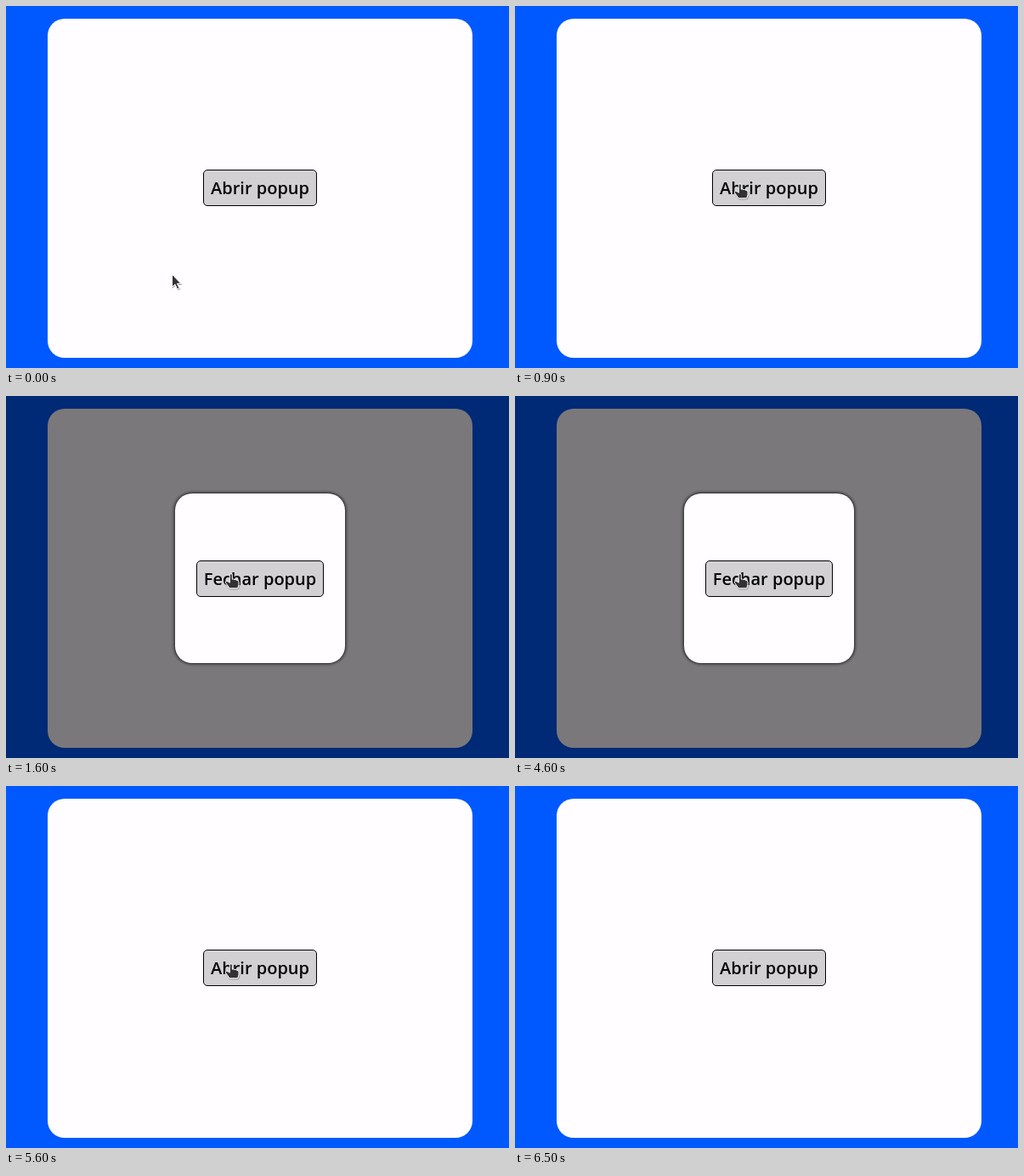
Recreate the animation shown at these times as an HTML page. Size 592 by 427 pixels, loop 7500 ms.

```html
<!DOCTYPE html>
<html lang="pt">
<head>
<meta charset="utf-8">
<title>Popup</title>
<style>
  html, body { margin: 0; width: 100%; height: 100%; overflow: hidden; background: #0059ff; }
  svg { display: block; width: 592px; height: 427px; }
  text { font: 600 20px "Open Sans", "Noto Sans", sans-serif; text-anchor: middle; fill: #050407; }
  .button { fill: #d2d0d2; stroke: #000; }
  .cursor path { fill: #333136; stroke: #fff; stroke-linejoin: round; }
</style>
</head>
<body>
<svg viewBox="0 0 592 427" xmlns="http://www.w3.org/2000/svg">
  <defs>
    <filter id="blur" x="-10%" y="-10%" width="120%" height="120%">
      <feGaussianBlur stdDeviation="1.4"/>
    </filter>
    <filter id="shade" x="-50%" y="-50%" width="200%" height="200%">
      <feDropShadow dx="0.5" dy="1" stdDeviation="0.7" flood-opacity="0.45"/>
    </filter>
  </defs>
  <rect id="page" width="592" height="427"/>
  <rect id="card" x="49" y="15" width="500" height="400" rx="20"/>
  <g id="main">
    <rect class="button" x="232.5" y="193.5" width="133" height="42" rx="4.5"/>
    <text x="299" y="222">Abrir popup</text>
  </g>
  <g id="popup">
    <rect x="197.5" y="113.5" width="203" height="203" rx="21.5" fill="#151318" opacity=".75" filter="url(#blur)"/>
    <rect x="199" y="115" width="200" height="200" rx="20" fill="#fffdff"/>
    <rect class="button" x="224.5" y="194.5" width="149" height="42" rx="4.5"/>
    <text x="299" y="223">Fechar popup</text>
  </g>
  <g id="arrow" class="cursor" filter="url(#shade)">
    <path d="M.5 .5V15.5L4 12.3L6.6 18L9 16.9L6.4 11.4H10.8Z"/>
  </g>
  <g id="hand" class="cursor" filter="url(#shade)">
    <path d="M-1.7 1.2Q-1.7 -.3 -.2 -.3T1.3 1.2V6.2Q2.6 5.4 3.8 6.6Q5.2 5.9 6.3 7.2Q8.8 6.8 9 9.3V12.6L7.7 16.8H-1.8L-6.6 10.2Q-7.2 8.6 -5.6 8.3Q-4.2 8.2 -1.7 10.2Z"/>
  </g>
</svg>
<script>
const LOOP = 7500, STEP = 100;
const START = [195, 316], NEAR = [269, 209], REST = [265, 210];
const EXIT = [[325, 190], [572, 48]];
const $ = id => document.getElementById(id);
const show = (id, on) => $(id).setAttribute("visibility", on ? "visible" : "hidden");
const smooth = p => p * p * (3 - 2 * p);
const within = (t, a, b) => t >= a && t < b;

function pointer(t) {
  if (t < 800) {
    const p = smooth(Math.min(7, Math.floor(t / STEP)) / 7);
    return START.map((v, i) => v + (NEAR[i] - v) * p);
  }
  if (t < 900) return NEAR;
  if (t < 6300) return REST;
  return EXIT[Math.floor((t - 6300) / STEP)];
}

function draw(t) {
  const open = within(t, 1600, 3600) || within(t, 4600, 5600);
  $("page").setAttribute("fill", open ? "#002976" : "#0059ff");
  $("card").setAttribute("fill", open ? "#7a787a" : "#fffdff");
  show("main", !open);
  show("popup", open);

  const pos = pointer(t);
  const over = !!pos && within(pos[0], 232, 366) && within(pos[1], 193, 236);
  show("arrow", !!pos && !over);
  show("hand", over);
  if (pos) $(over ? "hand" : "arrow").setAttribute("transform", `translate(${pos})`);
}

const begin = performance.now();
function tick() {
  draw((performance.now() - begin) % LOOP);
  requestAnimationFrame(tick);
}
tick();
</script>
</body>
</html>
```
